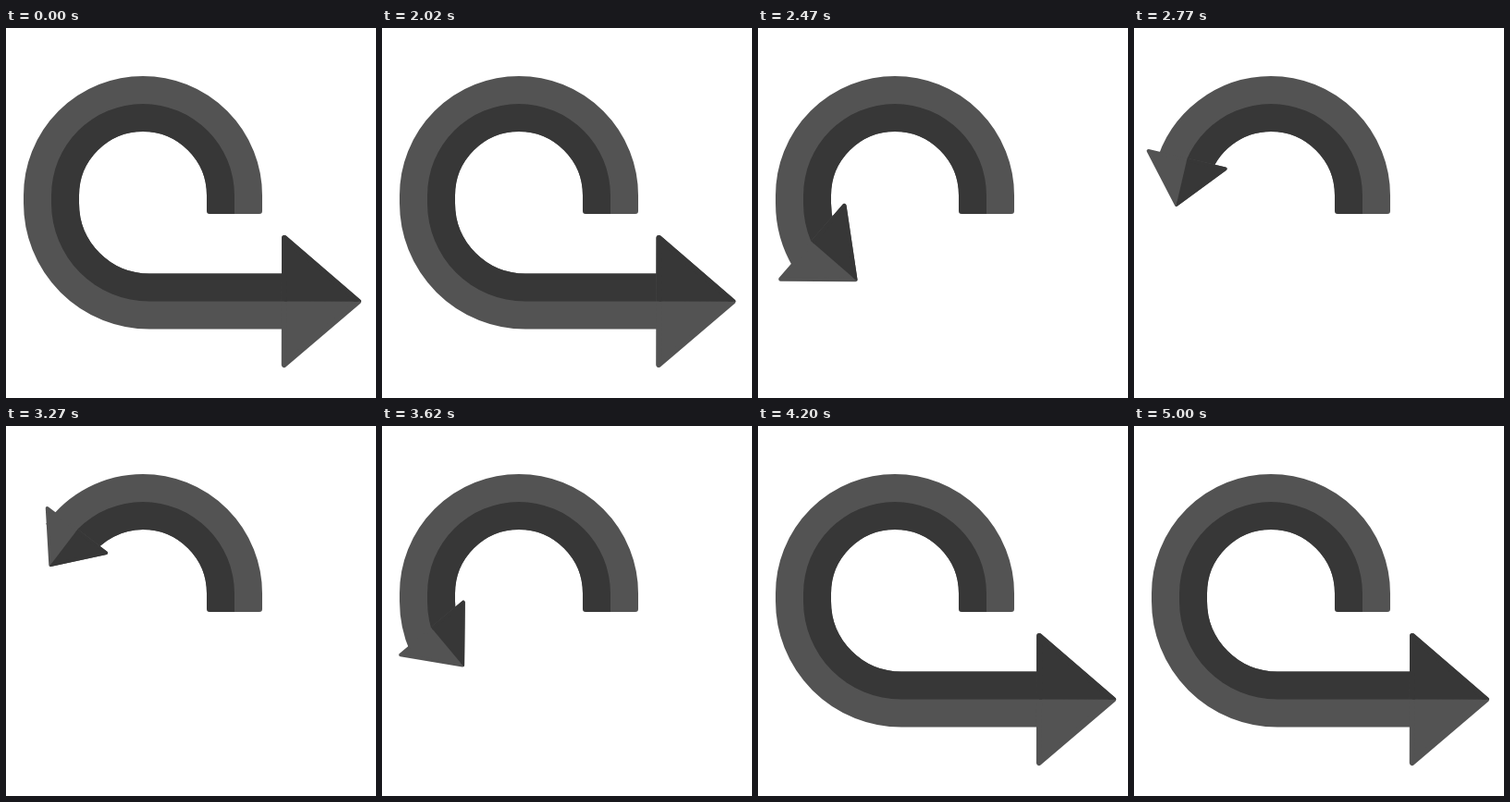
These frames come from a looping animation (400x400 px, 5020 ms). An HTML page:

```html
<!DOCTYPE html>
<html lang="en">
<head>
<meta charset="utf-8">
<title>Looping arrow</title>
<style>
  html, body { margin: 0; width: 100%; height: 100%; overflow: hidden; background: #fff; }
  svg { display: block; width: 100vw; height: 100vh; }
  .light { fill: #535353; stroke: #535353; }
  .dark { fill: #373737; stroke: #373737; }
  .body { fill: none; stroke-width: 60; }
  .cap { stroke: none; }
  .head { stroke-width: 6; stroke-linejoin: round; }
</style>
</head>
<body>
<svg viewBox="0 0 400 400">
  <defs>
    <path id="track" d="M247 201V181A99 99 0 0 0 49 181V189.5A106 106 0 0 0 155 295.5H400"/>
    <path id="tri" d="M3 -68.5L83 0L3 68.5Z"/>
    <clipPath id="inside">
      <path d="M247 201V181A99 99 0 0 0 49 181V189.5A106 106 0 0 0 155 295.5H400V240H247Z"/>
    </clipPath>
    <clipPath id="upper"><rect x="-10" y="-90" width="120" height="90"/></clipPath>
    <clipPath id="stage"><path d="M0 0H400V400H0V201H220Q217 201 217 198V201H277V198Q277 201 274 201H400V0Z"/></clipPath>
    <mask id="corners" maskUnits="userSpaceOnUse" x="0" y="0" width="400" height="400">
      <rect width="400" height="400" fill="#fff"/>
      <path d="M216 202V198H217Q217 201 220 201V202ZM278 202V198H277Q277 201 274 201V202Z"/>
    </mask>
  </defs>
  <g mask="url(#corners)">
    <use href="#track" class="light body"/>
    <g clip-path="url(#inside)"><use href="#track" class="dark body"/></g>
  </g>
  <g id="head" class="head">
    <use href="#tri" class="light"/>
    <g clip-path="url(#upper)"><use href="#tri" class="dark"/></g>
  </g>
</svg>
<script>
  const LOOP = 5020;
  const OVERLAP = 15; // body tucked under the head

  // [time, distance along the track]
  const travel = [
    [0, 649], [1995, 649], [2470, 382], [2520, 355.5], [3085, 249], [3270, 254],
    [3620, 367.5], [3870, 532], [4200, 652], [4330, 661], [4690, 645], [4980, 649], [LOOP, 649]
  ];
  // [time, head scale]
  const size = [
    [0, 1], [1995, 1], [2470, .767], [2520, .71], [3085, .575], [3270, .585],
    [3620, .645], [3870, .815], [4180, 1], [LOOP, 1]
  ];

  const track = document.getElementById('track');
  const head = document.getElementById('head');

  const secant = (k, i) => (k[i + 1][1] - k[i][1]) / (k[i + 1][0] - k[i][0]);

  // Slope at a key: flat at ends and turning points
  function slope(k, i) {
    if (i === 0 || i === k.length - 1) return 0;
    const a = secant(k, i - 1), b = secant(k, i);
    return a * b <= 0 ? 0 : 2 * a * b / (a + b);
  }

  // Monotone cubic interpolation
  function sample(k, t) {
    let i = 0;
    while (i < k.length - 2 && t >= k[i + 1][0]) i++;
    const [t0, v0] = k[i], [t1, v1] = k[i + 1];
    const d = t1 - t0, u = (t - t0) / d, w = 1 - u;
    return v0 * (1 + 2 * u) * w * w + v1 * u * u * (3 - 2 * u)
      + d * u * w * (slope(k, i) * w - slope(k, i + 1) * u);
  }

  // Steady turn that eases into a level heading
  function heading(s) {
    const d = 441 - s;
    return .34 * (d + Math.sqrt(d * d + 150));
  }

  function draw(now) {
    const t = now % LOOP;
    const s = sample(travel, t);
    const p = track.getPointAtLength(s);
    track.setAttribute('stroke-dasharray', `${s + OVERLAP} 2000`);
    head.setAttribute('transform',
      `translate(${p.x} ${p.y}) rotate(${heading(s)}) scale(${sample(size, t)})`);
    requestAnimationFrame(draw);
  }

  draw(performance.now());
</script>
</body>
</html>
```
